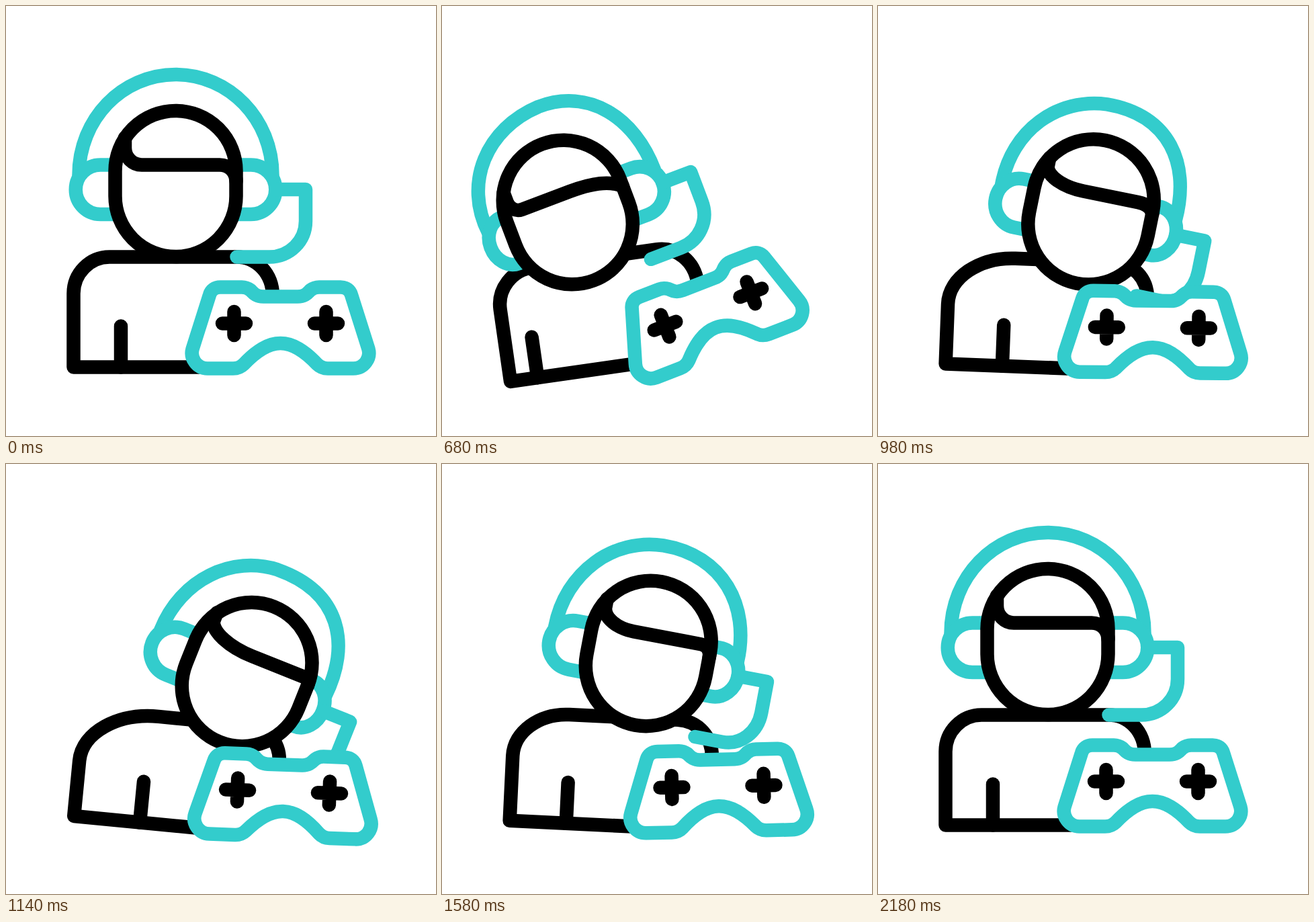
An HTML page that plays this animation: 640x640 px, repeating every 2400 ms.

```html
<!DOCTYPE html>
<html lang="en">
<head>
<meta charset="utf-8">
<title>Gamer</title>
<style>
  html, body { margin: 0; width: 100%; height: 100%; overflow: hidden; background: #fff; }
  svg { display: block; width: 100%; height: 100%; }
  path { fill: none; stroke: #000; stroke-width: 20.5; stroke-linejoin: round; }
  .cap { stroke-linecap: round; }
  .cyan path { stroke: #3cc; }
  path.solid { fill: #fff; }
</style>
</head>
<body>
<svg viewBox="0 0 640 640">
  <g id="body">
    <path id="torso"/>
    <path id="arm" class="cap"/>
  </g>
  <g id="head">
    <g class="cyan">
      <path id="band"/>
      <path id="ears"/>
      <path id="boom" class="cap"/>
    </g>
    <path class="solid" d="M162.5 246A90 90 0 0 1 342.5 246V283A90 90 0 0 1 162.5 283Z"/>
    <path id="hair" class="cap"/>
  </g>
  <g id="pad">
    <g class="cyan">
      <path class="solid" d="M408.5 502C427 502 444 513 463 533C467 537 472 539.5 479 539.5H517
        C533 539.5 544 524 539 509L514 430C512 423 506 418.5 498 418.5H466Q459 418.5 453 423
        C449 427 445 432.5 434 432.5H383C372 432.5 368 427 364 423Q358 418.5 351 418.5H319
        C311 418.5 305 423 303 430L278 509C273 524 284 539.5 300 539.5H338
        C345 539.5 350 537 354 533C373 513 390 502 408.5 502Z"/>
    </g>
    <path class="cap" d="M322 472.5H357M339.5 455V490M459 472.5H494M476.5 455V490"/>
  </g>
</svg>
<script>
const LOOP = 2400;

// lean left, lean right, hold, back upright
const T = { left: 590, right: 1180, leave: 1330, rest: 1820 };

// offsets of each full lean from the upright pose
const LEFT = { x: -74.5, y: 43.8, tilt: -23, body: -8.9, drop: 0, arm: -33, padX: -13, padY: -23 };
const RIGHT = { x: 108, y: 49, tilt: 22.3, body: 5.7, drop: 1, arm: 28.5, padX: 5.2, padY: 15.4 };

// time, angle
const PAD_TILT = [[0, 0], [590, -23], [1080, 2.8], [1330, -3.2], [1820, 0.4], [2180, 0]];

const el = id => document.getElementById(id);
const draw = (id, d) => el(id).setAttribute('d', d);
const place = (id, t) => el(id).setAttribute('transform', t);

function ease(u) {
  u = Math.min(1, Math.max(0, u));
  const a = u ** 1.72, b = (1 - u) ** 1.72;
  return a / (a + b);
}

const span = (t, from, to) => ease((t - from) / (to - from));

function track(keys, t) {
  for (let i = 1; i < keys.length; i++) {
    const [t0, v0] = keys[i - 1], [t1, v1] = keys[i];
    if (t < t1) return v0 + (v1 - v0) * span(t, t0, t1);
  }
  return keys[keys.length - 1][1];
}

function render(t) {
  const goL = span(t, 0, T.left);
  const goR = span(t, T.left, T.right);
  const back = span(t, T.leave, T.rest);
  const l = goL * (1 - goR);
  const r = goR * (1 - back);
  const mix = k => l * LEFT[k] + r * RIGHT[k];
  const arc = e => 4 * e * (1 - e);

  // body
  place('body', `translate(0 ${mix('drop')}) rotate(${mix('body')} 251 537.5)`);
  const sx = 154 + 58 * r, sy = 428 + 27 * r, top = 373.5 + 4.5 * r;
  draw('torso', `M288 537.5H100.5V${sy}
    C100.5 ${sy - (sy - top) * 0.55} ${sx - (sx - 100.5) * 0.55} ${top} ${sx} ${top}
    H343C373 ${top} 397 398 397 432`);
  const ax = 171 + mix('arm');
  draw('arm', `M${ax} 476.5V537.5`);

  // head, swinging on shallow arcs
  const hx = mix('x') - 7.5 * arc(goL) + 3 * arc(back);
  const hy = mix('y') + 1.5 * arc(goL) - 8 * arc(goR) - 6 * arc(back);
  place('head', `translate(${hx} ${hy}) rotate(${mix('tilt')} 252.5 264.5)`);

  const apex = 252.5 + 16 * (l - r);
  draw('band', `M${108.5 + 24 * l} 252
    C${108.5 + 14 * l} 168 ${173 + 12 * l - 6 * r} ${102 + 3 * l + 6 * r} ${apex} ${102 + r}
    C${332 + 4 * r + 16 * l} ${102 - 3 * r} ${396.5 - 17 * r} ${168 - 3 * r} ${396.5 - 24 * r} 252`);

  // the ear on the far side slides behind the face
  const cl = 140.5 + 18 * l, cr = 364.5 - 18 * r;
  const rl = 36.75 - 6 * l, rr = 36.75 - 6 * r;
  draw('ears', `M180 236.5H${cl}A${rl} 36.75 0 0 0 ${cl} 310H180
    M325 236.5H${cr}A${rr} 36.75 0 0 1 ${cr} 310H325`);

  const bx = 446 - 25 * r;
  draw('boom', `M${cr + rr} 273H${bx}V320
    C${bx} 350 ${422 - 20 * r} 373.5 ${392 - 14 * r} 373.5H343.5`);

  const hl = 177 - 4 * l, cut = 318 - 56 * l + 18 * r;
  draw('hair', `M${hl} ${196 + 8 * l}V${211 + 8 * l - 2 * r}
    C${hl + 3 * r} ${225 + 3 * l - r} ${188 - 10 * l + 24 * r} 236.5 ${202 - 15 * l + 48 * r} 236.5
    H${cut}C${332 - 42 * l + 8 * r} 236.5 ${342.5 - 17.5 * l} ${247 - 7 * l - 9 * r}
    342.5 ${261 - 3 * l - 15 * r}`);

  // controller
  place('pad', `translate(${mix('padX')} ${mix('padY')}) rotate(${track(PAD_TILT, t)} 408 472.5)`);
}

const start = performance.now();
function tick() {
  render((performance.now() - start) % LOOP);
  requestAnimationFrame(tick);
}
tick();
</script>
</body>
</html>
```
